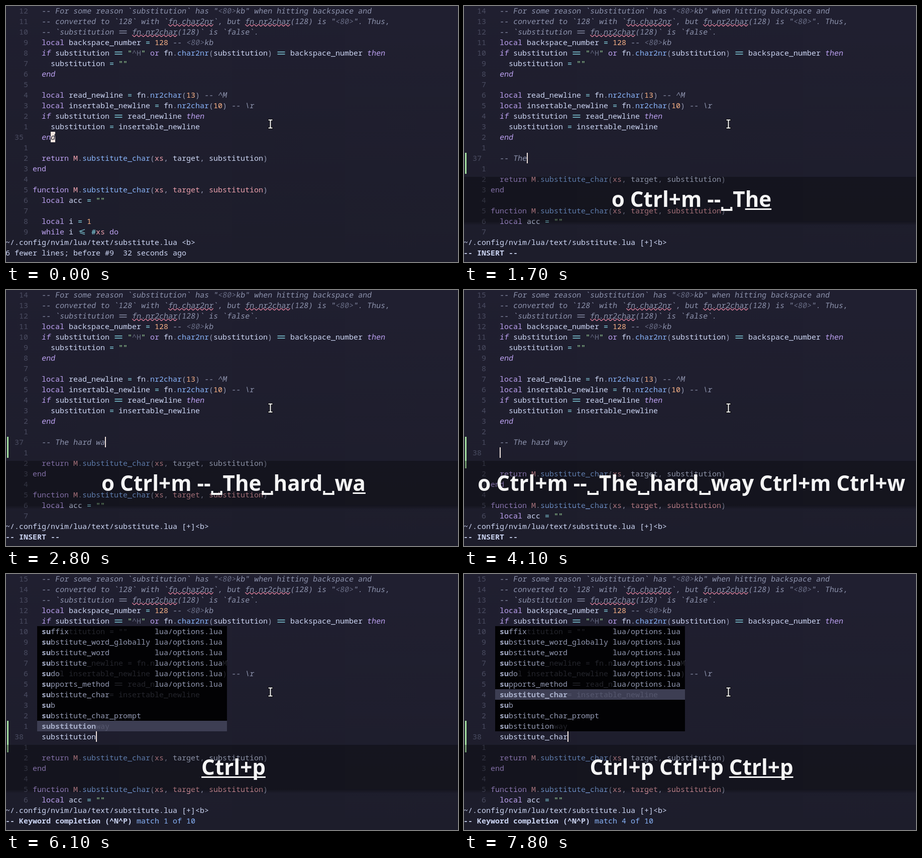
An HTML page with a canvas that plays this animation: 900x511 px, repeating every 8000 ms.

```html
<!DOCTYPE html>
<html>
<head>
<meta charset="utf-8">
<style>
html, body { margin: 0; width: 100%; height: 100%; overflow: hidden; background: #1e1e2d; }
canvas { display: block; }
</style>
</head>
<body>
<canvas id="stage" width="900" height="511"></canvas>
<script>
const ctx = document.getElementById('stage').getContext('2d');
const LOOP = 8000, CELL = 9, LINE = 21, LEFT = 53, CODE_ROWS = 22;
const MONO = '15px "Noto Sans Mono", monospace';
const KEY_FONT = 'bold 42.1px "Noto Sans", "Open Sans", sans-serif';
const C = {
  text: '#cdd6f4', mauve: '#bda2f2', blue: '#89b4fa', sky: '#89dceb', green: '#a6e3a1',
  peach: '#fab387', maroon: '#eba0ac', grey: '#9399b2', comment: '#8d93ad',
  dim: '#666a82', number: '#4a4c61', cursor: '#f1e4df', curl: '#f38ba8'
};

const code = [
  '  -- For some reason `substitution` has "<80>kb" when hitting backspace and',
  '  -- converted to `128` with `fn.char2nr`, but fn.nr2char(128) is "<80>". Thus,',
  '  -- `substitution == fn.nr2char(128)` is `false`.',
  '  local backspace_number = 128 -- <80>kb',
  '  if substitution == "^H" or fn.char2nr(substitution) == backspace_number then',
  '    substitution = ""',
  '  end',
  '',
  '  local read_newline = fn.nr2char(13) -- ^M',
  '  local insertable_newline = fn.nr2char(10) -- \\r',
  '  if substitution == read_newline then',
  '    substitution = insertable_newline',
  '  end',
  '',
  '  return M.substitute_char(xs, target, substitution)',
  'end',
  '',
  'function M.substitute_char(xs, target, substitution)',
  '  local acc = ""',
  '',
  '  local i = 1',
  '  while i <= #xs do'
];

const words = ['suffix', 'substitute_word_globally', 'substitute_word', 'substitute', 'sudo',
  'supports_method', 'substitute_char', 'sub', 'substitute_char_prompt', 'substitution'];
const MENU_ROWS = 6, MENU_COL = 27, POP_ROW = 5, POP_END = 43;

// Each step changes part of the state; "|" in keys marks where the underline starts.
const typed = 'o Ctrl+m --␣The␣hard␣way';
const note = s => ['', s];
const third = s => ['', '-- The hard way', s];
const steps = [
  [0, { ins: [], keys: '', sign: 0, match: 0 }],
  [100, { ins: [''] }],
  [200, { keys: '|o' }],
  [300, { keys: 'o', sign: 1 }],
  [400, { ins: note('') }],
  [500, { keys: 'o |Ctrl+m', sign: 2 }],
  [600, { keys: 'o Ctrl+m' }],
  [800, { ins: note('-'), keys: 'o Ctrl+m |-' }],
  [1000, { ins: note('--'), keys: 'o Ctrl+m -|-' }],
  [1200, { ins: note('-- '), keys: 'o Ctrl+m --' }],
  [1300, { keys: 'o Ctrl+m --|␣' }]
];
[1500, 1600, 1700, 1800, 2000, 2100, 2200, 2300, 2500, 2700, 2800, 3000].forEach((t, i) => {
  const end = 13 + i, from = i == 1 || i == 2 ? 13 : end - 1;
  steps.push([t, {
    ins: note('-- The hard way'.slice(0, 4 + i)),
    keys: typed.slice(0, from) + '|' + typed.slice(from, end)
  }]);
});
steps.push(
  [3200, { keys: typed }],
  [3600, { ins: third('-- ') }],
  [3700, { keys: typed + ' |Ctrl+m', sign: 3 }],
  [3800, { ins: third('') }],
  [3900, { keys: typed + ' Ctrl+m |Ctrl+w' }],
  [4100, { keys: typed + ' Ctrl+m Ctrl+w' }],
  [4500, { ins: third('s'), keys: typed + ' Ctrl+m Ctrl+w |s' }],
  [4600, { ins: third('su'), keys: typed + ' Ctrl+m Ctrl+w s|u' }],
  [4800, { keys: typed + ' Ctrl+m Ctrl+w su' }],
  [5500, { keys: '' }],
  [6000, { match: 1 }],
  [6100, { keys: '|Ctrl+p' }],
  [6200, { keys: 'Ctrl+p' }],
  [6700, { keys: '' }],
  [7200, { match: 2, keys: '|Ctrl+p' }],
  [7400, { match: 3, keys: 'Ctrl+p' }],
  [7500, { keys: 'Ctrl+p |Ctrl+p' }],
  [7700, { match: 4, keys: 'Ctrl+p Ctrl+p' }],
  [7800, { keys: 'Ctrl+p Ctrl+p |Ctrl+p' }]
);

const colX = col => LEFT + col * CELL;
const rowY = row => row * LINE - 1;

function rect(x, y, w, h, color) {
  ctx.fillStyle = color;
  ctx.fillRect(x, y, w, h);
}

// Text on the grid, with "==" and "<=" joined into wide signs.
function put(s, col, row, color, style = '') {
  const base = rowY(row) + 16, slant = style == 'italic';
  ctx.save();
  ctx.translate(colX(col), base);
  ctx.fillStyle = ctx.strokeStyle = color;
  for (const m of s.matchAll(/==|<=/g)) {
    const x = m.index * CELL;
    if (m[0] == '==') {
      ctx.fillRect(x + 1.5, -8, 15, 1.4);
      ctx.fillRect(x + 1.5, -3.6, 15, 1.4);
    } else {
      ctx.lineWidth = 1.3;
      ctx.stroke(new Path2D(`M${x + 14} -10l-10 3.5 10 3.5m-10 -.5l10 3.5`));
    }
  }
  if (slant) ctx.transform(1, 0, -0.16, 1, -0.6, 0);
  ctx.font = (slant ? '' : style) + ' ' + MONO;
  ctx.fillText(s.replace(/==|<=/g, '  '), 0, 0);
  ctx.restore();
}

function putParts(s, split, col, row, color, style) {
  for (const part of s.split(split)) {
    put(part, col, row, split.test(part) ? C.dim : color, style);
    col += part.length;
  }
}

function wordLook(word, line, end) {
  if (/^(if|then)$/.test(word) || (word == 'end' && line[0] == ' ')) return [C.mauve, 'italic'];
  if (/^(local|or|end|return|function|while|do)$/.test(word)) return [C.mauve];
  if (line[end] == '(') return [C.blue];
  if (word == 'M' || word == 'xs' || line.startsWith('function')) return [C.maroon];
  return [C.text];
}

function putCode(line, row) {
  for (const m of line.matchAll(/(--.*)|("[^"]*")|([A-Za-z_]\w*)|(\d+)|(==|<=|[=#-])|[(),.]/g)) {
    const [s, comment, string, word, num, op] = m, col = m.index;
    if (comment) putParts(s, /(<80>)/, col, row, C.comment, 'italic');
    else if (string) putParts(s, /(\^H)/, col, row, C.green);
    else if (word) put(s, col, row, ...wordLook(s, line, col + s.length));
    else put(s, col, row, num ? C.peach : op ? C.sky : C.grey);
  }
}

function curl(row, col) {
  const x0 = colX(col), y = rowY(row) + 18.5;
  ctx.strokeStyle = C.curl;
  ctx.lineWidth = 1.2;
  ctx.beginPath();
  for (let x = 0; x <= 90; x++) ctx.lineTo(x0 + x, y - 1.7 * Math.cos(x / CELL * 2 * Math.PI));
  ctx.stroke();
}

function popup(lines, sel) {
  words.forEach((word, i) => {
    const row = POP_ROW + i, y = rowY(row), menu = i < MENU_ROWS;
    const on = i == sel, end = 2 + word.length;
    rect(colX(1), y, (POP_END - 1) * CELL, LINE, on ? '#3d3e53' : '#020204');
    // code shows faintly through the empty cells
    ctx.save();
    ctx.beginPath();
    ctx.rect(colX(end), y, ((menu ? MENU_COL : POP_END) - end) * CELL, LINE);
    if (menu) ctx.rect(colX(POP_END - 1), y, CELL, LINE);
    ctx.clip();
    ctx.globalAlpha = 0.17;
    put(lines[row], 0, row, C.text);
    ctx.restore();
    const bold = on ? word.length : 2;
    put(word.slice(0, bold), 2, row, '#a6adc8', 'bold');
    put(word.slice(bold), 2 + bold, row, C.grey);
    if (menu) put('lua/options.lua', MENU_COL, row, C.grey);
  });
}

const BOX = 24;
function keyWidth(s) {
  return s.split('␣').reduce((w, part) => w + BOX + ctx.measureText(part).width, -BOX);
}

function overlay(keys) {
  const fade = ctx.createLinearGradient(0, 430, 0, 438);
  fade.addColorStop(0, 'rgba(0,0,0,.32)');
  fade.addColorStop(1, 'rgba(0,0,0,0)');
  rect(0, 341, 900, 97, fade);
  ctx.font = KEY_FONT;
  ctx.fillStyle = '#f5f5f5';
  const s = keys.replace('|', ''), w = keyWidth(s), left = 453 - w / 2;
  let x = left;
  s.split('␣').forEach((part, i) => {
    if (i) {
      ctx.fillRect(x + 1, 401, 4, 8);
      ctx.fillRect(x + 1, 405, 22, 4);
      ctx.fillRect(x + 19, 401, 4, 8);
      x += BOX;
    }
    ctx.fillText(part, x, 401);
    x += ctx.measureText(part).width;
  });
  const mark = keys.indexOf('|');
  if (mark >= 0) {
    const from = keyWidth(s.slice(0, mark));
    ctx.fillRect(left + from, 404, w - from, 3);
  }
}

function pointer() {
  const beam = new Path2D('M523.5 227.5h6M526.5 228v15M523.5 243.5h6');
  ctx.lineCap = 'square';
  for (const [width, color] of [[4, '#000'], [2, '#fff']]) {
    ctx.lineWidth = width;
    ctx.strokeStyle = color;
    ctx.stroke(beam);
  }
  ctx.lineCap = 'butt';
}

function draw(t) {
  const st = Object.assign({}, ...steps.filter(s => s[0] <= t).map(s => s[1]));
  const sel = words.length - st.match;
  const ins = st.match ? third(words[sel]) : st.ins;
  const lines = [...code.slice(0, 13), ...ins.map(s => s && '  ' + s), ...code.slice(13)].slice(0, CODE_ROWS);
  const current = 12 + ins.length;

  const bg = ctx.createLinearGradient(0, 0, 0, 511);
  bg.addColorStop(0, '#201f30');
  bg.addColorStop(1, '#1d1d2b');
  rect(0, 0, 900, 511, bg);

  lines.forEach((line, row) => {
    const n = String(row == current ? 35 + ins.length : Math.abs(row - current));
    put(n, row == current ? -4 : -1 - n.length, row, C.number);
    putCode(line, row);
  });
  curl(1, 30);
  curl(1, 47);
  curl(2, 22);
  if (st.sign) rect(2, rowY(st.sign < 2 ? 13 : 14), 3, LINE * st.sign, C.green);

  if (ins.length) {
    rect(colX(2 + ins[ins.length - 1].length), rowY(current), 2, LINE, C.cursor);
  } else {
    rect(colX(4), rowY(current), CELL, LINE, C.cursor);
    put('d', 4, current, '#1e1e2e', 'italic');
  }
  if (st.match) popup(lines, sel);

  put('~/.config/nvim/lua/text/substitute.lua ' + (ins.length ? '[+]' : '') + '<b>', -6, 22, C.text);
  if (st.match) {
    put('-- Keyword completion (^N^P)', -6, 23, C.text, 'bold');
    put(`match ${st.match} of 10`, 23, 23, C.blue);
  } else if (ins.length) {
    put('-- INSERT --', -6, 23, C.text, 'bold');
  } else {
    put('6 fewer lines; before #9  32 seconds ago', -6, 23, C.text);
  }

  if (st.keys) overlay(st.keys);
  pointer();
}

const start = performance.now();
function tick() {
  draw((performance.now() - start) % LOOP);
  requestAnimationFrame(tick);
}
tick();
</script>
</body>
</html>
```
